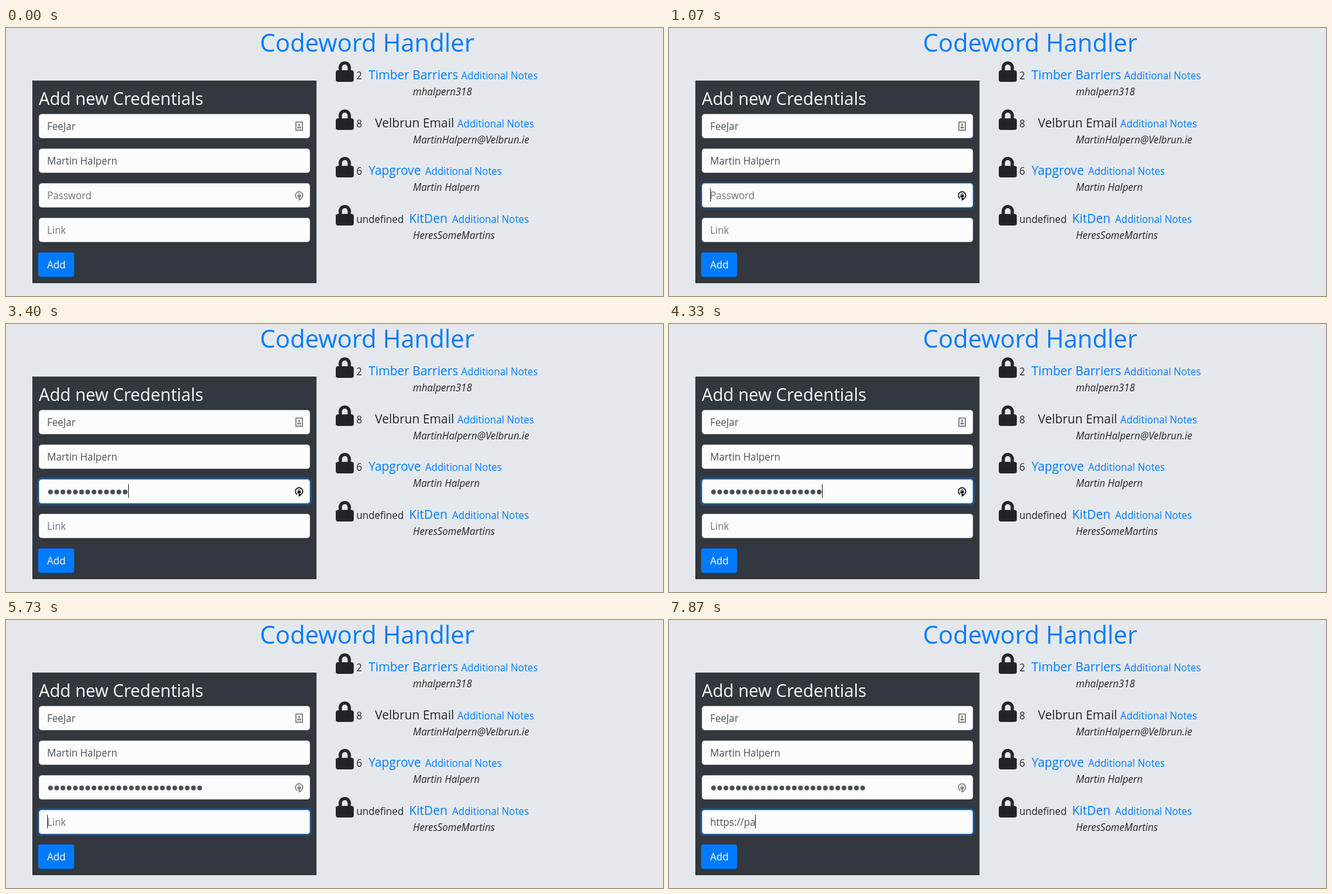
Recreate the animation shown at these times as an HTML page. Size 1022 by 418 pixels, loop 8 s.

```html
<!DOCTYPE html>
<html lang="en">
<head>
<meta charset="utf-8">
<title>Codeword Handler</title>
<style>
  html, body { margin: 0; width: 100%; height: 100%; overflow: hidden; background: #e4e8ec; }
  svg { display: block; }
  /* sizes are slightly reduced because Open Sans runs wide */
  text { font: 15.4px "Open Sans", "Noto Sans", sans-serif; fill: #212529; white-space: pre; }
  .title { font-size: 38px; fill: #007bff; }
  .head { font-size: 26.75px; fill: #f8f9fa; }
  .name { font-size: 19.1px; }
  .link { fill: #007bff; }
  .user { font-style: italic; font-size: 15.4px; }
  .value { fill: #495057; }
  .hint { fill: #6c757d; }
  .light { fill: #fff; }
</style>
</head>
<body>
<svg id="stage" width="1022" height="418" viewBox="0 0 1022 418"></svg>
<script>
const stage = document.getElementById('stage');

function add(tag, attrs, parent = stage) {
  const el = document.createElementNS('http://www.w3.org/2000/svg', tag);
  for (const key in attrs) el.setAttribute(key, attrs[key]);
  parent.appendChild(el);
  return el;
}
function label(x, y, str, cls = '') {
  const el = add('text', { x, y, class: cls });
  el.textContent = str;
  return el;
}
function box(x, y, width, height, rx, fill, more) {
  return add('rect', { x, y, width, height, rx, fill, ...more });
}
const show = (el, on) => el.setAttribute('visibility', on ? 'visible' : 'hidden');

// Form
label(395, 37, 'Codeword Handler', 'title');
box(41, 82, 442, 316, 0, '#32383e');
label(51, 120, 'Add new Credentials', 'head');

function field(y) {
  const glow = box(48, y - 3, 428, 44, 6.5, '#007bff', { opacity: 0 });
  box(51.5, y + .5, 421, 37, 4, '#fcfcfc', { stroke: '#ced4da' });
  const edge = box(51.5, y + .5, 421, 37, 4, 'none', { stroke: '#80bdff', opacity: 0 });
  return k => {
    glow.setAttribute('opacity', .3 * k);
    edge.setAttribute('opacity', k);
  };
}
field(134);
field(188);
const focusPass = field(242), focusLink = field(296);
label(64, 159, 'FeeJar', 'value');
label(64, 213, 'Martin Halpern', 'value');
const passHint = label(64, 267, 'Password', 'hint');
const linkHint = label(64, 321, 'Link', 'hint');
const linkText = label(64, 321, '', 'value');
box(50, 350, 56, 38, 4, '#007bff');
label(64, 375, 'Add', 'light');

// Field icons
const card = add('g', { fill: '#808386' });
add('path', {
  d: 'M451 146.7h10v12.8h-10z', fill: 'none', stroke: '#808386',
  'stroke-width': 1.8, 'stroke-linejoin': 'round'
}, card);
add('circle', { cx: 456, cy: 151, r: 1.7 }, card);
add('path', { d: 'M453 156.5v-1q0-2 3-2t3 2v1z' }, card);

const key = add('g', { fill: 'currentColor', stroke: 'currentColor' });
add('path', {
  d: 'M453 266a5.7 5.7 0 1 1 6.4-.4', fill: 'none', 'stroke-width': 1.7
}, key);
add('path', { d: 'M455.5 264.5v4.5l4-2.3z', 'stroke-width': .6 }, key);
add('path', { d: 'M453.4 260.2h5.2v4h-5.2z', stroke: 'none' }, key);
add('path', { d: 'M454.6 260.5v-1a1.4 1.4 0 0 1 2.8 0v1', fill: 'none' }, key);

// Saved entries: y, number, name, its x, is a link, notes x, user
const lock = 'M400 224h-24v-72C376 68.2 307.8 0 224 0S72 68.2 72 152v72H48c-26.5 0-48 21.5-48 48v192' +
  'c0 26.5 21.5 48 48 48h352c26.5 0 48-21.5 48-48V272c0-26.5-21.5-48-48-48z' +
  'm-104 0H152v-72c0-39.7 32.3-72 72-72s72 32.3 72 72z';
[
  [52, '2', 'Timber Barriers', 564, true, 708, 'mhalpern318'],
  [127, '8', 'Velbrun Email', 574, false, 702, 'MartinHalpern@Velbrun.ie'],
  [201, '6', 'Yapgrove', 564, true, 652, 'Martin Halpern'],
  [276, 'undefined', 'KitDen', 627, true, 694, 'HeresSomeMartins']
].forEach(([y, id, name, x, linked, notesX, user]) => {
  add('path', { d: lock, fill: '#212529', transform: `translate(513 ${y}) scale(.0625)` });
  label(545, y + 28, id);
  label(x, y + 28, name, linked ? 'name link' : 'name');
  label(notesX, y + 28, 'Additional Notes', 'link');
  label(633, y + 53, user, 'user');
});

// Typing
const LOOP = 8000, PITCH = 9.67;
const PASS_FOCUS = 1000, LINK_FOCUS = 5600;
const passKeys = [1400, 1670, 2000, 2070, 2200, 2330, 2400, 2530, 2930, 3070, 3200, 3400, 3400,
  3600, 3730, 3870, 4070, 4330, 4600, 4730, 4870, 4930, 5070, 5200, 5270];
const linkKeys = [6200, 6330, 6400, 6670, 6730, 7000, 7200, 7400, 7670, 7870];
const address = 'https://pa';

const dots = passKeys.map((_, i) =>
  add('circle', { cx: 69.2 + i * PITCH, cy: 262, r: 3.7, fill: '#495057' }));
const caret = add('rect', { width: 1, height: 21, fill: '#212529' });
const pointer = add('path', {
  d: 'M.5.5v16l3.7-3.5 2.5 5.8 2.6-1.1-2.5-5.7h5z',
  fill: '#fff', stroke: '#000', 'stroke-linejoin': 'round'
});

const typed = (keys, t) => keys.filter(k => k <= t).length;
const fade = (t, start) => Math.max(0, Math.min(1, (t - start + 50) / 200));

function draw(t) {
  const inLink = t >= LINK_FOCUS, inPass = t >= PASS_FOCUS && !inLink;
  const passCount = typed(passKeys, t), linkCount = typed(linkKeys, t);

  const toLink = inLink ? fade(t, LINK_FOCUS) : 0;
  focusPass(t < PASS_FOCUS ? 0 : inLink ? 1 - toLink : fade(t, PASS_FOCUS));
  focusLink(toLink);
  key.setAttribute('color', inPass ? '#16181b' : '#808386');

  dots.forEach((dot, i) => show(dot, i < passCount));
  show(passHint, !passCount);
  show(linkHint, !linkCount);
  linkText.textContent = address.slice(0, linkCount);

  // The caret blinks, starting over at each key press
  const last = inLink ? linkKeys[linkCount - 1] || LINK_FOCUS : passKeys[passCount - 1] || PASS_FOCUS;
  show(caret, (inLink || inPass) && (t - last) % 1060 < 530);
  const width = inLink ? (linkCount && linkText.getComputedTextLength()) : passCount * PITCH;
  caret.setAttribute('x', Math.round(64 + width));
  caret.setAttribute('y', inLink ? 304 : 250);

  // The arrow only shows in the gap between two fields
  show(pointer, t >= 530 && t < 670);
  const away = Math.max(0, 600 - t);
  pointer.setAttribute('transform', `translate(${138 + away * .04} ${279 + away * .2})`);
}

function tick() {
  draw(performance.now() % LOOP);
  requestAnimationFrame(tick);
}
tick();
</script>
</body>
</html>
```
